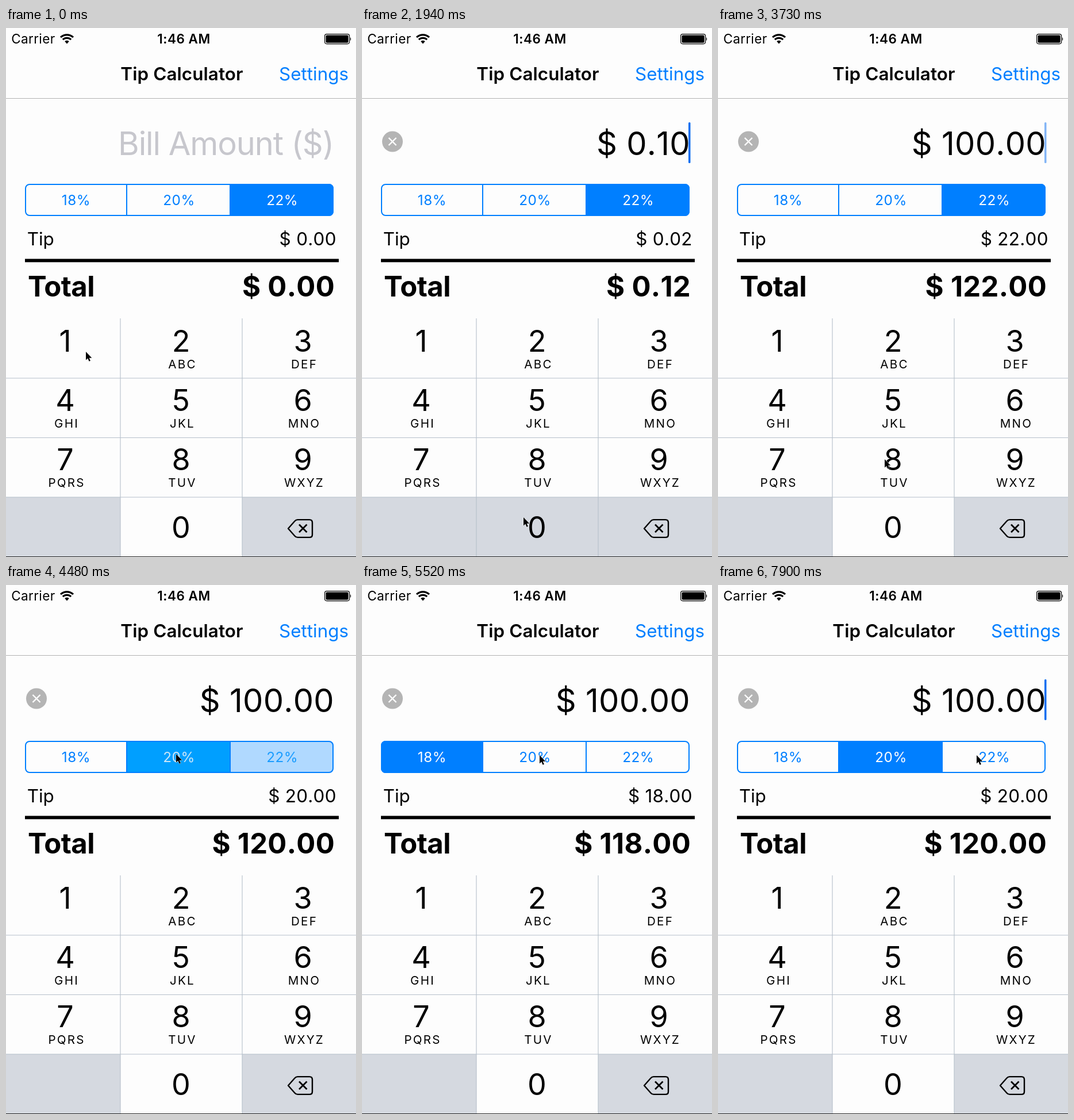
Recreate the animation shown at these times as an HTML page. Size 609x920 px, loop 8 s.

```html
<!DOCTYPE html>
<html lang="en">
<head>
<meta charset="utf-8">
<title>Tip Calculator</title>
<style>
  html, body { margin: 0; width: 100%; height: 100%; overflow: hidden; background: #fdfdfd; }
  svg { display: block; }
  text { font-family: Inter, Roboto, sans-serif; font-optical-sizing: none; white-space: pre; }
  .end { text-anchor: end; }
  .mid { text-anchor: middle; }
  .body { font-size: 31.4px; }
  .bill { font-size: 56px; }
  .total { font-size: 49px; font-weight: 700; }
  .sum { font-kerning: none; letter-spacing: .3px; }
  .digit { font-size: 52px; text-anchor: middle; }
  .letters { font-size: 20.6px; letter-spacing: 2.2px; text-anchor: middle; }
  .seg { font-size: 24.3px; letter-spacing: .5px; text-anchor: middle; }
</style>
</head>
<body>
<svg width="609" height="920" viewBox="0 0 609 920">
  <rect width="609" height="920" fill="#fdfdfd"/>

  <!-- status bar -->
  <text x="9.2" y="27" font-size="22.5" letter-spacing=".4">Carrier</text>
  <g fill="none" stroke="#000" stroke-width="3.2">
    <path d="M95 16.2a16 16 0 0 1 22 0M98.8 20.2a10.4 10.4 0 0 1 14.4 0"/>
    <path d="M106 27.5l-3.7-4.2a5.4 5.4 0 0 1 7.4 0z" fill="#000" stroke="none"/>
  </g>
  <text class="mid" x="309.5" y="27" font-size="22.5" font-weight="600" letter-spacing=".5">1:46 AM</text>
  <rect x="554.6" y="10.6" width="43" height="17" rx="3.5" fill="none" stroke="#000" stroke-width="1.2"/>
  <rect x="556.5" y="12.5" width="39.2" height="13.2" rx="2"/>
  <path d="M599 16q2.4 3.1 0 6.4z"/>

  <!-- navigation bar -->
  <text class="body mid" x="306" y="91" font-weight="600" letter-spacing=".1">Tip Calculator</text>
  <text class="body end" x="596" y="91" fill="#007fff">Settings</text>
  <path d="M0 122.5h609" stroke="#b2b2b2"/>

  <!-- bill -->
  <text id="hint" class="bill end" x="570" y="220.5" fill="#c7c7cd" letter-spacing="-1.1">Bill Amount ($)</text>
  <text id="bill" class="bill sum end" x="571" y="220.5"></text>
  <g id="clear">
    <circle cx="53" cy="197.5" r="18" fill="#b4b4b4"/>
    <path d="M46.5 191l13 13m0-13l-13 13" stroke="#fff" stroke-width="2.4"/>
  </g>
  <rect id="caret" x="568" y="164" width="3.5" height="71" rx="1.5" fill="#0a6df0"/>

  <!-- rate picker -->
  <clipPath id="round"><rect x="33" y="271" width="537" height="56" rx="8"/></clipPath>
  <g id="fills" clip-path="url(#round)"></g>
  <path d="M210 272v54M390 272v54" stroke="#007fff" stroke-width="2"/>
  <rect x="34" y="272" width="535" height="54" rx="7" fill="none" stroke="#007fff" stroke-width="2"/>
  <g id="labels"></g>

  <!-- results -->
  <text class="body" x="36.7" y="378">Tip</text>
  <text id="tip" class="body sum end" x="574.8" y="378"></text>
  <rect x="33" y="401.5" width="546" height="5.8"/>
  <text class="total" x="38" y="467" letter-spacing="-.6">Total</text>
  <text id="total" class="total sum end" x="572" y="467"></text>

  <!-- keypad -->
  <rect y="816" width="609" height="104" fill="#d5d9e0"/>
  <g id="keys"></g>
  <path d="M199 505v414M411 505v414M0 609h609M0 712.5h609M0 816h609" stroke="#b6c0cb" stroke-width="1.1"/>
  <path d="M0 919.5h609" stroke="#222"/>
  <g fill="none" stroke="#000" stroke-width="2.4" stroke-linejoin="round">
    <path d="M491 870.5l11.5-13q2-2.4 5-2.4h20.5q5 0 5 5v20.8q0 5-5 5h-20.5q-3 0-5-2.4z"/>
    <path d="M510 863.5l13.5 13.5m0-13.5l-13.5 13.5" stroke-width="2.8"/>
  </g>

  <path id="pointer" d="M0 0v14.5l3.3-3 2.3 5.2 2.3-1-2.2-5h4.6z" stroke="#fff" paint-order="stroke"/>
</svg>
<script>
const $ = id => document.getElementById(id);
const BLUE = '#007fff', WHITE = '#fdfdfd', GREY = '#d5d9e0', LOOP = 8000;
const rates = [18, 20, 22], edges = [33, 210, 390, 570];

function add(parent, tag, attrs, text = '') {
  const el = document.createElementNS('http://www.w3.org/2000/svg', tag);
  for (const name in attrs) el.setAttribute(name, attrs[name]);
  el.textContent = text;
  return parent.appendChild(el);
}

// keypad: the ten digits, with letters under 2 to 9
const letters = ',,ABC,DEF,GHI,JKL,MNO,PQRS,TUV,WXYZ'.split(',');
const columns = [[0, 199, 103], [199, 212, 304.5], [411, 198, 516.5]];
const keys = letters.map((word, n) => {
  const row = n ? Math.floor((n - 1) / 3) : 3;
  const [x, width, mid] = columns[n ? (n - 1) % 3 : 1];
  const y = 505 + row * 103.6;
  const back = add($('keys'), 'rect', { x, y, width, height: 103.6 });
  add($('keys'), 'text', { class: 'digit', x: mid, y: n ? 562.5 + row * 103.2 : 887 }, n);
  add($('keys'), 'text', { class: 'letters', x: mid + 2.5, y: 591.5 + row * 103.3 }, word);
  return back;
});

const segments = rates.map((rate, i) => ({
  fill: add($('fills'), 'rect', { x: edges[i], y: 271, width: edges[i + 1] - edges[i], height: 56 }),
  label: add($('labels'), 'text', { class: 'seg', x: [121.9, 301, 480.7][i], y: 308 }, rate + '%')
}));

// Each step changes part of the state and holds until the next one.
const at = (x, y) => ({ x, y });
const steps = [
  [0, { bill: 0, key: -1, sel: 2, old: -1, hot: -1, ...at(139, 563) }],
  [300, { key: 1 }],
  [448, { key: -1, bill: 1 }],
  [596, at(152, 612)],
  [745, at(200, 720)],
  [893, at(250, 808)],
  [1041, at(276, 845)],
  [1190, at(281, 851)],
  [1490, { key: 0 }],
  [1640, { key: -1, bill: 10 }],
  [1940, { key: 0 }],
  [2090, { key: -1, bill: 100 }],
  [2390, { key: 0 }],
  [2540, { key: -1, bill: 1000 }],
  [2690, { key: 0 }],
  [2840, { key: -1, bill: 10000 }],
  [3439, at(283, 835)],
  [3588, at(290, 750)],
  [3736, at(297, 560)],
  [3885, at(299, 390)],
  [4033, at(297, 312)],
  [4182, at(296, 294)],
  [4330, { hot: 1 }],
  [4480, { hot: -1, sel: 1, old: 2 }],
  [4630, { old: -1, ...at(250, 296) }],
  [4780, at(135, 298)],
  [4926, { hot: 0, ...at(125, 298) }],
  [5075, { hot: -1, sel: 0, old: 1 }],
  [5223, { old: -1, ...at(160, 298) }],
  [5372, at(255, 297)],
  [5520, at(309, 296)],
  [5820, { hot: 1 }],
  [5968, { hot: -1, sel: 1, old: 0 }],
  [6116, { old: -1, ...at(345, 297) }],
  [6264, at(410, 297)],
  [6412, at(445, 296)],
  [6560, at(456, 295)],
  [7300, at(454, 295)],
  [7450, at(452, 295)],
  [7750, at(451, 296)],
  [7900, at(450, 296)]
];

const money = cents => '$ ' + (cents / 100).toFixed(2);

// The caret blinks, but stays lit while digits are being typed.
function caretOpacity(t) {
  if (t < 300) return 0;
  if (t < 1490) return t < 448 ? .5 : t < 893 ? 1 : t < 1041 ? .5 : 0;
  if (t < 3290) return 1;
  const phase = (t - 3140) % 1040;
  return phase < 150 ? .5 : phase < 450 ? 0 : phase < 600 ? .5 : 1;
}

function segmentColors(i, s) {
  if (i === s.sel) return s.old < 0 ? [BLUE, WHITE] : ['#009fff', '#cbe6f8'];
  if (i === s.old) return ['#b0d9ff', '#1a9cff'];
  return [i === s.hot ? '#cce5ff' : WHITE, BLUE];
}

function draw(t) {
  const s = Object.assign({}, ...steps.filter(step => step[0] <= t).map(step => step[1]));
  const tip = Math.round(s.bill * rates[s.sel] / 100);
  $('hint').style.display = s.bill ? 'none' : '';
  $('clear').style.display = s.bill ? '' : 'none';
  $('bill').textContent = s.bill ? money(s.bill) : '';
  $('tip').textContent = money(tip);
  $('total').textContent = money(s.bill + tip);
  $('caret').setAttribute('opacity', caretOpacity(t));
  keys.forEach((key, n) => key.setAttribute('fill', n === s.key ? GREY : WHITE));
  segments.forEach(({ fill, label }, i) => {
    const [back, ink] = segmentColors(i, s);
    fill.setAttribute('fill', back);
    label.setAttribute('fill', ink);
  });
  $('pointer').setAttribute('transform', `translate(${s.x} ${s.y})`);
}

const begin = performance.now();
function tick() {
  draw((performance.now() - begin) % LOOP);
  requestAnimationFrame(tick);
}
tick();
</script>
</body>
</html>
```
